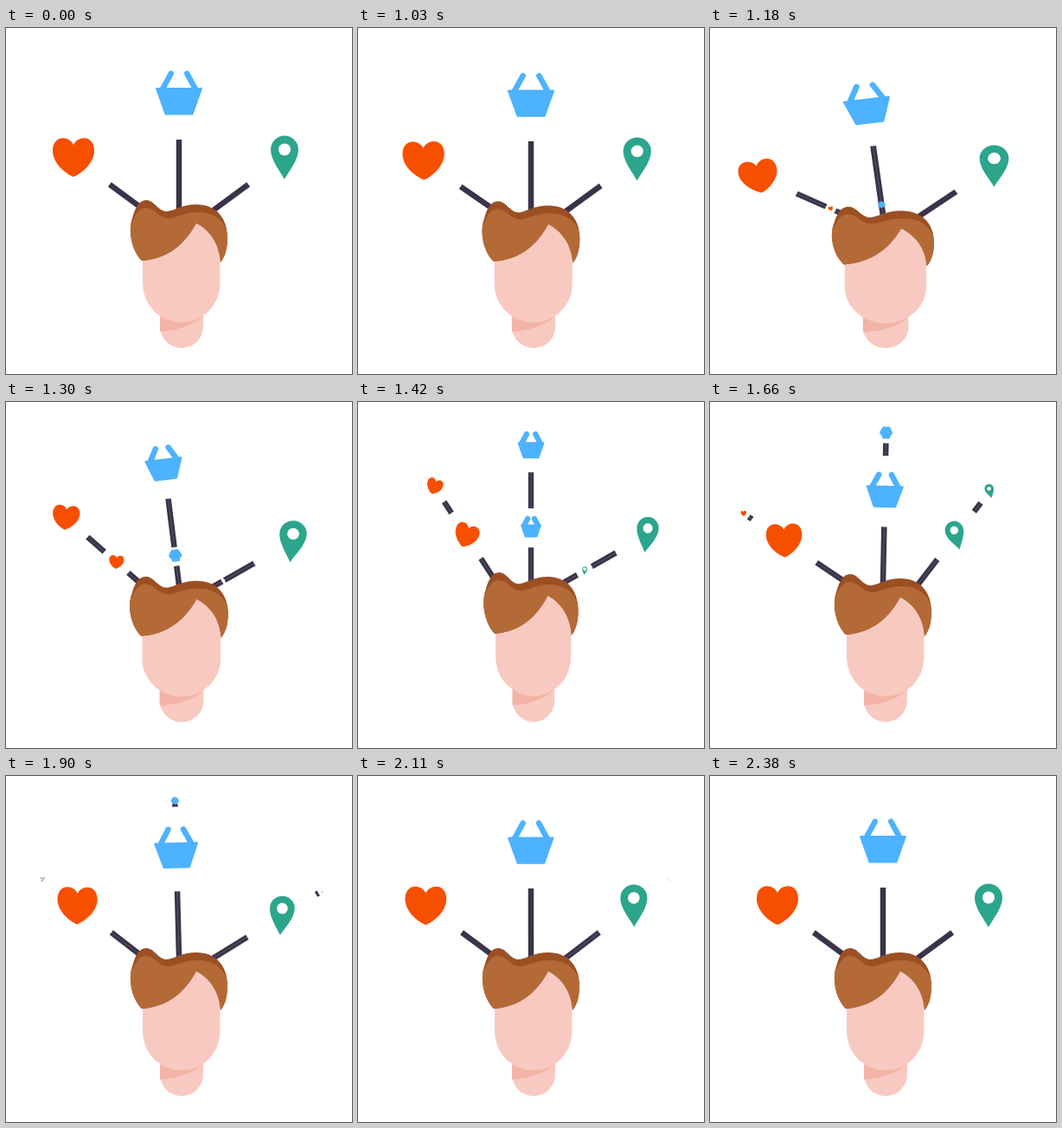
Recreate the animation shown at these times as an HTML page with a canvas. Size 400 px wide and 400 px high, loop 2.41 s.

```html
<!DOCTYPE html>
<html lang="en">
<head>
<meta charset="utf-8">
<title>Ideas</title>
<style>
html, body { margin: 0; width: 100%; height: 100%; overflow: hidden; background: #fff; }
canvas { display: block; width: 100vmin; height: 100vmin; }
</style>
</head>
<body>
<canvas id="stage"></canvas>
<script>
const LOOP = 2410, START = 1030, STEP = 30, LAST = 2380;
const GAP = 52;     // clear space around a full-size icon
const FLIGHT = 51;  // how far an outgoing icon travels
const ROOT = 7;     // where a new icon leaves the head

const stage = document.getElementById('stage');
const ctx = stage.getContext('2d');

const heartShape = new Path2D('M0 -15C-5 -26 -24 -26.5 -24 -8C-24 6 -10 18 0 22C10 18 24 6 24 -8C24 -26.5 5 -26 0 -15Z');
const pinShape = new Path2D('M0 25C-4 17 -16 3 -16 -9.5A16 16 0 0 1 16 -9.5C16 3 4 17 0 25Z');
const neck = new Path2D('M178 320H228V345A25 25 0 0 1 178 345Z');
const neckShade = new Path2D('M178 320H228V332Q214 348 178 351Z');
const face = new Path2D('M158 217H247.5V295.5A44.75 44.75 0 0 1 158 295.5Z');
const hairEdge = 'C256 258 252 266 248 271C247 250 236 234 220 225.5C207 250 187 267 157 269C145 257 141 234 146 220';
const hairBack = new Path2D('M146 220C149 208 154 199 162 199C172 199 176 213 187 212C197 210 204 204 220 204C243 204 256 220 256 242' + hairEdge + 'Z');
const hairFront = new Path2D('M145.5 226C149 215 154 208 162 208C172 208 177 221 189 220C200 218 207 213 222 213C243 213 256 226 256 242' + hairEdge + 'Z');

// Smooth curve through [time, value] keys without overshoot.
function curve(keys) {
  const n = keys.length;
  const slope = i => (keys[i + 1][1] - keys[i][1]) / (keys[i + 1][0] - keys[i][0]);
  const tangent = i => {
    if (i === 0 || i === n - 1) return 0;
    const a = slope(i - 1), b = slope(i);
    return a * b <= 0 ? 0 : 2 * a * b / (a + b);
  };
  return t => {
    if (t <= keys[0][0]) return keys[0][1];
    if (t >= keys[n - 1][0]) return keys[n - 1][1];
    let i = 0;
    while (t > keys[i + 1][0]) i++;
    const [t0, v0] = keys[i], [t1, v1] = keys[i + 1];
    const d = t1 - t0, u = (t - t0) / d, w = 1 - u;
    return v0 * w * w * (1 + 2 * u) + v1 * u * u * (3 - 2 * u)
      + d * u * w * (tangent(i) * w - tangent(i + 1) * u);
  };
}

const squashX = curve([[990, 1], [1030, 1.006], [1180, 1.053], [1420, 0.975], [1660, 1]]);
const squashY = curve([[990, 1], [1030, 0.992], [1180, 0.956], [1420, 1.012], [1660, 1]]);

function fill(path, color) {
  ctx.fillStyle = color;
  ctx.fill(path);
}

function heart() {
  fill(heartShape, '#f74f00');
}

function pin(scale) {
  fill(pinShape, '#2ca58d');
  ctx.beginPath();
  ctx.arc(0, -9.5, Math.max(7, 2 / scale), 0, 7);
  ctx.fillStyle = '#fff';
  ctx.fill();
}

// Strokes keep their weight while the basket shrinks.
function basket(scale) {
  ctx.fillStyle = ctx.strokeStyle = '#4db2ff';
  ctx.lineCap = ctx.lineJoin = 'round';
  ctx.beginPath();
  ctx.moveTo(-26, -7);
  ctx.lineTo(26, -7);
  ctx.lineTo(15.5, 22.5);
  ctx.lineTo(-15.5, 22.5);
  ctx.closePath();
  ctx.fill();
  ctx.lineWidth = 2 / scale;
  ctx.stroke();
  ctx.beginPath();
  for (const side of [-1, 1]) {
    ctx.moveTo(side * 9.3, -24.3);
    ctx.lineTo(side * 19, -6.5);
  }
  ctx.lineWidth = 6.5 / scale;
  ctx.stroke();
}

const branches = [
  {
    icon: heart, base: [158, 209], end: [78, 150],
    swing: curve([[990, 0], [1030, -1.4], [1190, -10.5], [1400, 20], [1660, -2.5], [1710, -3.5], [1900, 1.4], [2100, 0]]),
    grow: curve([[1080, 0], [1180, 0.11], [1420, 0.6], [1660, 0.865], [1900, 0.96], [2200, 1]])
  },
  {
    icon: basket, base: [200, 209], end: [200, 77],
    swing: curve([[1040, 0], [1180, -7.4], [1230, -9], [1420, 0], [1530, 4], [1660, 1.2], [1800, -2.5], [1900, -1.5], [2150, 0]]),
    grow: curve([[1110, 0], [1180, 0.04], [1420, 0.43], [1660, 0.79], [1900, 0.94], [2250, 1]])
  },
  {
    icon: pin, base: [242, 209], end: [322, 150],
    swing: curve([[1170, 0], [1370, 8.5], [1420, 7.5], [1600, -18.5], [1660, -16], [1900, 4.7], [2120, -1], [2300, 0]]),
    grow: curve([[1240, 0], [1420, 0.19], [1660, 0.67], [1900, 0.9], [2300, 1]])
  }
];

function drawBranch({ icon, base, end, swing, grow }, t) {
  const dx = end[0] - base[0], dy = end[1] - base[1];
  const reach = Math.hypot(dx, dy), lean = Math.atan2(dx, -dy);
  const p = grow(t), moving = p > 0 && p < 0.985;
  const outgoing = { r: reach + FLIGHT * p, s: 1 - p };
  const incoming = { r: ROOT + (reach - ROOT) * p, s: p };

  const segment = (from, to) => {
    if (to <= from) return;
    ctx.beginPath();
    ctx.moveTo(0, -from);
    ctx.lineTo(0, -to);
    ctx.lineCap = 'butt';
    ctx.lineWidth = 6.5;
    ctx.strokeStyle = '#3a3349';
    ctx.stroke();
    if (!moving) return;
    ctx.lineWidth = 0.8;
    ctx.strokeStyle = 'rgba(255,255,255,.18)';
    ctx.stroke();
  };
  const place = ({ r, s }) => {
    if (s < 0.015) return;
    ctx.save();
    ctx.translate(0, -r);
    ctx.rotate(-lean);
    ctx.scale(s, s);
    icon(s);
    ctx.restore();
  };

  ctx.save();
  ctx.translate(...base);
  ctx.rotate(lean + swing(t) * Math.PI / 180);
  const tip = outgoing.r - GAP * outgoing.s;
  if (p > 0) {
    segment(-8, incoming.r - GAP * p);
    if (moving) segment(incoming.r + GAP * p, tip);
  } else {
    segment(-8, tip);
  }
  place(outgoing);
  place(incoming);
  ctx.restore();
}

function drawHead() {
  fill(neck, '#f8c9c0');
  fill(neckShade, '#f4b3a7');
  fill(face, '#f8c9c0');
  fill(hairBack, '#9c4f23');
  fill(hairFront, '#b36a37');
}

function draw() {
  const size = Math.round(stage.clientWidth * devicePixelRatio);
  if (stage.width !== size) stage.width = stage.height = size;

  const now = performance.now() % LOOP;
  const t = now < START ? 0 : Math.min(LAST, START + STEP * Math.floor((now - START) / STEP));

  ctx.setTransform(size / 400, 0, 0, size / 400, 0, 0);
  ctx.fillStyle = '#fff';
  ctx.fillRect(0, 0, 400, 400);
  ctx.translate(200, 370);
  ctx.scale(squashX(t), squashY(t));
  ctx.translate(-200, -370);
  for (const branch of branches) drawBranch(branch, t);
  drawHead();
  requestAnimationFrame(draw);
}
draw();
</script>
</body>
</html>
```
